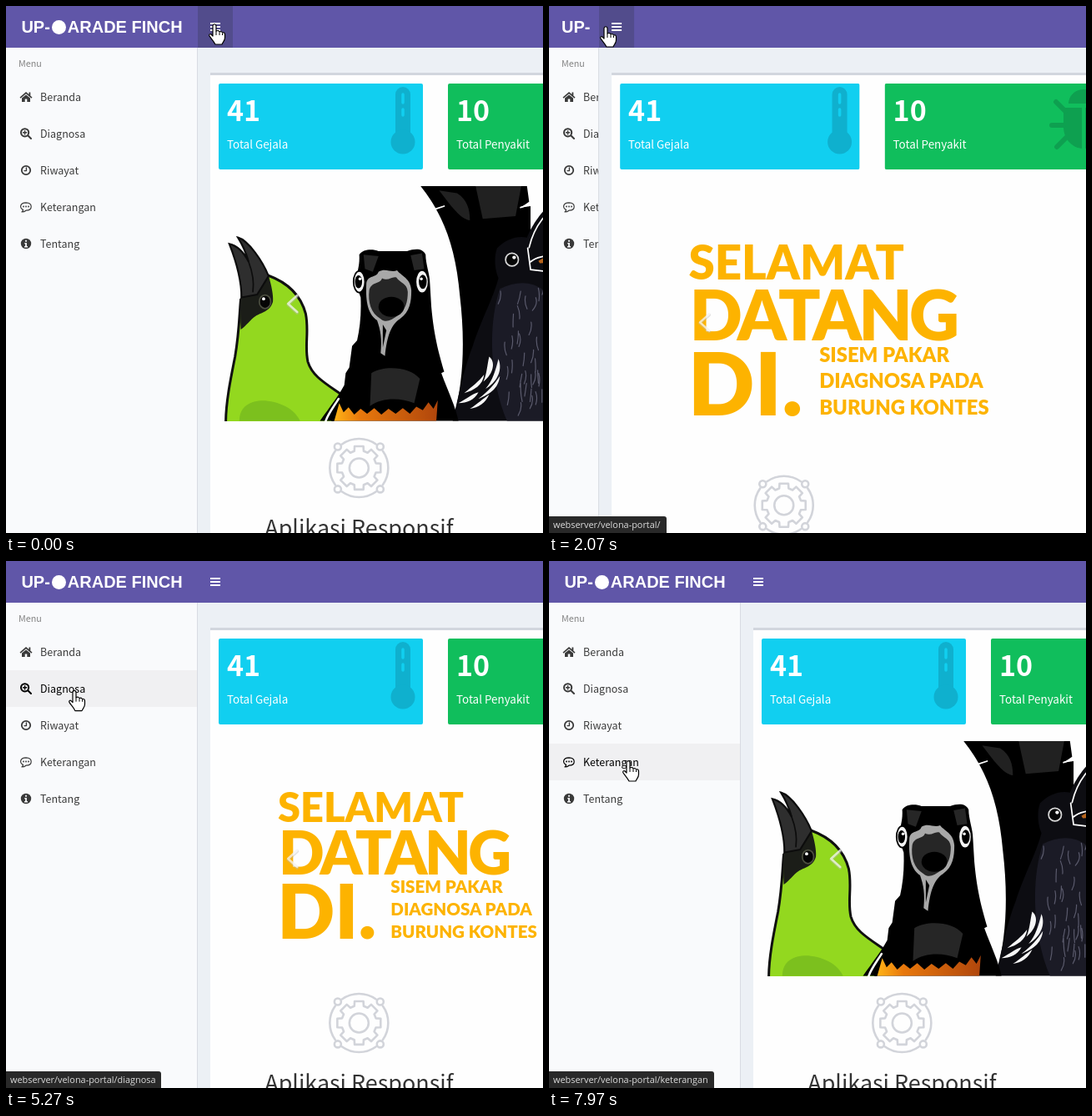
An HTML page that plays this animation: 644x632 px, repeating every 8000 ms.

```html
<!DOCTYPE html>
<html lang="id">
<head>
<meta charset="utf-8">
<title>Dashboard</title>
<style>
  html, body { margin: 0; width: 100%; height: 100%; overflow: hidden; }
  #stage { position: relative; width: 644px; height: 632px; overflow: hidden; }
  #stage > svg { position: absolute; left: 0; top: 0; }
  text { font-family: "Noto Sans CJK JP", "Noto Sans CJK SC", "Noto Sans CJK", "Noto Sans", sans-serif; }
  .poster text { font-family: Lato, sans-serif; font-weight: 900; fill: #fdb300; }
  .poster .block { font-family: "Liberation Sans", sans-serif; font-weight: 700; stroke: #fdb300; stroke-width: 6; }
  .card text { fill: #fff; font-size: 13.4px; }
  .card .count { font-size: 34px; font-weight: 700; }
  .line { fill: none; stroke-linecap: round; stroke-linejoin: round; }
  #logo { position: absolute; left: 0; top: 0; height: 50px; box-sizing: border-box; overflow: hidden;
    text-align: center; color: #fff; font: bold 20px/50px "Liberation Sans", Arial, sans-serif; }
  #logo i { display: inline-block; width: 17px; height: 17px; margin: 0 2px; border-radius: 50%;
    background: #fff; vertical-align: -2px; }
  #status { position: absolute; left: 0; bottom: 0; height: 20px; padding: 0 7px 0 5px; border-radius: 0 3px 0 0;
    background: #292929; color: #dcdcdc; white-space: nowrap; font: 10.9px/20px "Open Sans", "Noto Sans", sans-serif; }
  #pointer { pointer-events: none; }
</style>
</head>
<body>
<div id="stage">
<svg width="644" height="632" viewBox="0 0 644 632">
  <defs>
    <linearGradient id="ember">
      <stop offset="0" stop-color="#ffb316"/><stop offset=".25" stop-color="#e8780c"/><stop offset="1" stop-color="#b0460c"/>
    </linearGradient>

    <g id="birds" transform="translate(-76 -216)">
      <!-- green bird -->
      <path d="M86 548C86 520 92 490 99 455C105 420 105 395 107 375L145 341C175 352 192 372 198 395C203 420 196 440 201 462C207 482 225 492 248 508L235 548Z" fill="#93d81f" stroke="#101010" stroke-width="3.5"/>
      <path d="M105 545C105 522 125 515 145 517C170 520 185 533 190 545Z" fill="#7cc01e"/>
      <path d="M108 350L146 342C150 355 153 370 152 378C148 392 135 393 128 398C120 403 115 412 107 417C106 395 107 370 108 350Z" fill="#1b1d18"/>
      <path d="M103 288C118 292 138 322 146 342L130 368L108 372C108 345 100 320 91 297C100 299 110 306 118 322C114 308 108 296 103 288Z" fill="#2e2e2e" stroke="#0c0c0c" stroke-width="2.5"/>
      <path class="line" d="M118 322C124 338 126 350 124 364" stroke="#0c0c0c" stroke-width="2"/>
      <ellipse cx="141" cy="378" rx="8" ry="9.5" fill="#050505" stroke="#4c4f40" stroke-width="2"/>
      <circle cx="139" cy="374" r="2.2" fill="#fff"/>

      <!-- tail and bird with open beak -->
      <path d="M359 216H508L511 238L499 246L513 244V290L480 380L404 545C420 490 421 430 414 370C408 300 390 255 359 216Z"/>
      <path d="M385 222L410 226C425 235 428 250 428 264C415 262 405 248 385 222ZM436 216H500L492 258L446 262Z" fill="#212121"/>
      <path class="line" d="M380 248l12 -4M499 246l12 -4" stroke="#fff" stroke-width="2"/>
      <path d="M466 303C478 290 495 285 508 288C515 270 535 240 552 236C565 234 563 245 558 258C550 275 546 295 545 312C560 315 570 322 579 328C568 334 558 336 552 338C556 360 552 385 558 405C570 430 572 445 578 460C590 485 592 500 586 510C594 525 594 535 593 545H404C412 510 420 470 432 440C445 400 460 375 468 345C462 330 462 315 466 303Z" fill="#0d0d12"/>
      <path d="M470 360C500 345 530 350 545 380C565 440 575 490 575 545H480C460 500 450 420 470 360Z" fill="#1b1b26"/>
      <path class="line" d="M511 302C518 272 538 246 557 242C546 272 541 296 541 313M509 303L513 333L549 337L575 328L545 315C535 312 520 316 513 322" stroke="#fff" stroke-width="2"/>
      <path d="M524 321C534 312 545 316 549 323L526 324Z" fill="#b8651c"/>
      <circle cx="487" cy="319" r="9" fill="#060606" stroke="#d8d8d8" stroke-width="2"/>
      <circle cx="490" cy="316" r="2.5" fill="#fff"/>
      <path id="plumes" class="line" stroke="#5a5a6c" stroke-width="1.4"/>
      <path d="M455 455C464 462 462 478 447 490C452 478 452 468 455 455ZM468 458C475 475 464 492 450 500C460 488 464 474 468 458ZM448 480C446 495 434 502 420 506C432 496 440 490 448 480ZM470 482C468 500 455 508 440 514C455 502 462 494 470 482ZM440 505C434 516 424 520 412 520C424 514 430 508 440 505ZM455 508C450 520 440 526 428 528C440 520 446 514 455 508Z" fill="#f6f6f6"/>

      <!-- dark bird facing forward -->
      <path d="M218 545C232 525 244 510 252 495L254 478L259 470L263 440L270 432C274 415 276 395 275 372L268 352C270 335 274 328 273 312C278 304 292 304 300 307H340C352 303 362 303 366 312C366 325 372 340 372 352L374 385C378 430 386 455 392 476L388 478C398 505 408 525 412 545Z"/>
      <path class="line" d="M226 545C230 534 238 524 244 514" stroke="#fff" stroke-width="3"/>
      <path d="M279 312L300 314L292 336L281 332ZM345 313L361 310L364 332L350 334ZM290 478C310 466 345 470 358 486L350 520C330 512 305 512 288 524Z" fill="#262626"/>
      <path d="M238 545L245 520L251 533L258 526L266 536L275 528L284 535L294 527L304 536L314 528L324 535L334 527L344 535L353 525L362 530L370 519L377 528L383 516L381 545Z" fill="url(#ember)"/>
      <path d="M283 352C285 340 297 345 300 336C310 330 318 338 326 334C332 342 345 345 346 362C346 378 344 392 330 402C318 410 312 425 309 454L303 450C305 430 303 418 298 404C283 394 282 372 283 352Z" fill="#a8a8a8"/>
      <path d="M287 362C290 349 302 354 305 345C314 350 318 342 325 344C330 352 340 352 341 364C341 378 338 390 326 398C318 404 310 408 303 402C289 394 285 378 287 362Z" fill="#262626"/>
      <ellipse cx="318" cy="385" rx="18" ry="14"/>
      <path d="M306 410L311 418L306 442Z"/>
      <g fill="#f4f4f4" stroke="#000" stroke-width="2">
        <ellipse cx="273" cy="350" rx="8" ry="15"/><ellipse cx="361" cy="350" rx="9" ry="16"/>
      </g>
      <ellipse cx="272" cy="350" rx="5" ry="9"/><ellipse cx="362" cy="350" rx="5.5" ry="10"/>
      <circle cx="274" cy="346" r="2" fill="#fff"/><circle cx="360" cy="346" r="2" fill="#fff"/>
    </g>

    <g id="bug">
      <path d="M-18 -20A18 17 0 0 1 18 -20Z"/>
      <path d="M-24 -15H24V8C24 24 12 34 0 34S-24 24 -24 8Z"/>
      <path class="line" d="M-22 -11L-33 -22M-24 6H-38M-20 20L-32 32M22 -11L33 -22M24 6H38M20 20L32 32" stroke="#0ea050" stroke-width="6"/>
      <path d="M0 -15V34" stroke="#10be5c" stroke-width="4"/>
    </g>
  </defs>

  <rect width="644" height="632" fill="#ecf0f5"/>

  <g id="content">
    <rect x="15" y="80" width="1400" height="3" fill="#d2d6de"/>
    <rect x="15" y="83" width="1400" height="560" fill="#fefefe"/>
  </g>

  <svg class="card" y="93" height="103">
    <rect width="100%" height="103" rx="2" fill="#11cff0"/>
    <g class="badge" fill="#0fb0ce">
      <rect x="-33" y="4" width="18" height="66" rx="9"/><circle cx="-24" cy="70" r="14.5"/>
      <path class="line" d="M-24 13V23M-24 31V38" stroke="#11cff0" stroke-width="3.5"/>
    </g>
    <text class="count" x="10" y="45">41</text><text x="10" y="78">Total Gejala</text>
  </svg>
  <svg class="card" y="93" height="103">
    <rect width="100%" height="103" rx="2" fill="#10be5c"/>
    <g class="badge"><use href="#bug" x="-49" y="44" fill="#0ea050"/></g>
    <text class="count" x="10" y="45">10</text><text x="10" y="78">Total Penyakit</text>
  </svg>

  <svg id="carousel" y="216" viewBox="0 0 1250 329.4" preserveAspectRatio="none">
    <g id="slideA" class="poster">
      <use href="#birds"/>
      <g transform="translate(625 -216)">
        <text x="145" y="340" font-size="68" letter-spacing="-2">WELCOME TO</text>
        <text class="block" x="-14 83 197" y="469" font-size="164">THE</text>
        <g font-size="35">
          <text x="295" y="378">EXPERT SYSTEM</text>
          <text x="295" y="425">ON PAGEANT</text>
          <text x="295" y="472">BIRD DIAGNOSIS</text>
        </g>
      </g>
    </g>
    <g id="slideB" class="poster">
      <text x="83" y="113" font-size="57">SELAMAT</text>
      <text x="84" y="187" font-size="84" letter-spacing="-4">DATANG</text>
      <text x="82" y="277" font-size="106">DI.</text>
      <g font-size="24">
        <text x="241" y="213">SISEM PAKAR</text>
        <text x="241" y="244">DIAGNOSA PADA</text>
        <text x="241" y="276">BURUNG KONTES</text>
      </g>
      <use href="#birds" transform="translate(1252 76) scale(-.77 .77)"/>
    </g>
  </svg>
  <g id="previous" class="line">
    <path d="M6 -10L-5 0L6 10" stroke="#b8b8b8" stroke-width="4" opacity=".4"/>
    <path d="M6 -11L-5 -1L6 9" stroke="#fff" stroke-width="2.6" opacity=".65"/>
  </g>

  <g id="feature">
    <g class="line" stroke="#d2d4da" stroke-width="2.6">
      <path id="gear"/>
      <circle r="11.5"/>
      <path id="orbit"/>
      <g id="nodes"></g>
    </g>
    <text y="82" text-anchor="middle" font-size="26.9" font-weight="300" fill="#333">Aplikasi Responsif</text>
  </g>

  <svg id="side" y="50" height="582">
    <rect width="230" height="582" fill="#f9fafc"/>
    <text id="heading" x="15" y="23" font-size="10.8" fill="#848484">Menu</text>
    <g id="items"></g>
  </svg>
  <path id="edge" d="M-.5 50V632" stroke="#d8dbe2"/>

  <rect width="644" height="50" fill="#6056a8"/>
  <g id="toggle">
    <rect id="toggleHover" width="42" height="50" fill="#524c8c"/>
    <path d="M15 21H27M15 25H27M15 29H27" stroke="#fff" stroke-width="2"/>
  </g>
</svg>

<div id="logo"></div>
<div id="status"></div>

<svg id="pointer" width="644" height="632">
  <g id="cursor" fill="#fff" stroke="#000" stroke-width="1.2" stroke-linejoin="round">
    <path id="arrow" d="M0 0V17L4 13.5L6.5 19.5L9.5 18L7 12.5H12Z"/>
    <g id="hand">
      <path d="M-2 2C-2 -1 2 -1 2 2V8C4 7 5.5 7.5 6 9C8 8 9 9 9.5 10C11 9.5 12.5 10 12.5 12V16C12.5 20 10 21 9 24H1C-1 20 -4 17 -6 14C-7 12 -5 11 -4 12L-2 14Z"/>
      <path d="M2 8V13M6 9.5V13M9.5 10.5V13" fill="none" stroke-width="1"/>
    </g>
  </g>
</svg>
</div>

<script>
const LOOP = 8000;
const $ = id => document.getElementById(id);
const set = (el, attrs) => { for (const k in attrs) el.setAttribute(k, attrs[k]); };
const move = (el, x, y = 0) => set(el, { transform: `translate(${x} ${y})` });
const show = (el, on) => { el.style.display = on ? '' : 'none'; };
const clamp = v => Math.min(1, Math.max(0, v));
const polar = (r, a) => `${(r * Math.cos(a)).toFixed(2)} ${(r * Math.sin(a)).toFixed(2)}`;

const MENU = [
  ['Beranda', '<path d="M-7.5 .5L0 -6L7.5 .5L6.5 1.7L0 -3.8L-6.5 1.7ZM-5 1.5L0 -2.6L5 1.5V6H1.3V2.5H-1.3V6H-5ZM3.5 -5.5H5.3V-1L3.5 -2.6Z"/>'],
  ['Diagnosa', '<path class="line" stroke="currentColor" stroke-width="2" d="M3.2 -1.2A4.6 4.6 0 1 1 -6 -1.2A4.6 4.6 0 0 1 3.2 -1.2ZM2.2 2.2L6 6"/><path stroke="currentColor" stroke-width="1.4" d="M-4 -1.2H1.2M-1.4 -3.8V1.4"/>'],
  ['Riwayat', '<circle r="5.2" class="line" stroke="currentColor" stroke-width="1.8"/><path class="line" stroke="currentColor" stroke-width="1.4" d="M.4 -3V.6H-2"/>'],
  ['Keterangan', '<path class="line" stroke="currentColor" stroke-width="1.2" d="M-3.5 3.4C-8 1 -7.5 -5 0 -5.2C8 -5 8.5 3.8 0 4.2C-1.5 5.5 -3 6 -5 6C-4 5 -3.5 4.5 -3.5 3.4Z"/><path class="line" stroke="currentColor" stroke-width="1.8" d="M-3 -.5H-3M0 -.5H0M3 -.5H3"/>'],
  ['Tentang', '<circle r="6.2"/><path d="M-1.8 -1H.9V3H2V4.4H-2V3H-.9V.3H-1.8ZM-.9 -4.2H.9V-2.2H-.9Z" fill="#f9fafc"/>'],
];
$('items').innerHTML = MENU.map(([label, icon]) => `<g>
  <rect x="0" y="-22" width="229" height="44" fill="#f0f0f2"/>
  <g transform="translate(24)" fill="currentColor">${icon}</g>
  <text x="41" y="5" font-size="12.5" font-weight="500" fill="currentColor">${label}</text></g>`).join('');
const items = [...$('items').children];
const cards = [...document.querySelectorAll('.card')];

// Gear outline with eight teeth, broken ring and four corner nodes
const teeth = [];
for (let i = 0; i < 8; i++)
  for (const [r, d] of [[21, -.27], [26.5, -.2], [26.5, .2], [21, .27]])
    teeth.push(polar(r, i * Math.PI / 4 + d));
set($('gear'), { d: `M${teeth.join('L')}Z` });
const quarters = [0, 1, 2, 3].map(i => i * Math.PI / 2);
set($('orbit'), { d: quarters.map(a => `M${polar(35, a - .62)}A35 35 0 0 1 ${polar(35, a + .62)}`).join('') });
$('nodes').innerHTML = quarters.map(a => {
  const [x, y] = polar(36, a + Math.PI / 4).split(' ');
  return `<circle cx="${x}" cy="${y}" r="4"/>`;
}).join('');

// Fine feather strokes
let seed = 7;
const random = () => (seed = seed * 16807 % 2147483647) / 2147483647;
let strokes = '';
for (let i = 0; i < 46; i++) {
  const y = 350 + random() * 170, x = 470 + (y - 350) * .05 + random() * (68 + (y - 350) * .16);
  strokes += `M${x.toFixed(1)} ${y.toFixed(1)}q${(random() * 6 - 2).toFixed(1)} 9 ${(random() * 8 - 5).toFixed(1)} 18`;
}
set($('plumes'), { d: strokes });

// CSS ease-in-out
function ease(x) {
  if (x <= 0) return 0;
  if (x >= 1) return 1;
  let lo = 0, hi = 1, u = .5;
  for (let i = 0; i < 24; i++) {
    u = (lo + hi) / 2;
    const v = 1 - u;
    if (1.26 * u * v * v + 1.74 * u * u * v + u ** 3 < x) lo = u; else hi = u;
  }
  return u * u * (3 - 2 * u);
}

const COLLAPSE = 246, EXPAND = 2021, SLIDES = [949, 5898];

const PATH = [[0, 250, 22], [450, 251, 22], [950, 250, 23], [1270, 145, 30], [1650, 72, 26], [1800, 68, 25],
  [2450, 68, 25], [2950, 74, 100], [3250, 77, 106], [4100, 77, 106], [4500, 80, 110], [4900, 82, 152],
  [5350, 82, 156], [5750, 84, 199], [7420, 85, 200], [7720, 95, 240], [8000, 95, 240]];
function pointerAt(t) {
  const i = PATH.findIndex(p => p[0] > t);
  const [t0, x0, y0] = PATH[i - 1], [t1, x1, y1] = PATH[i];
  const u = (t - t0) / (t1 - t0), k = u * u * (3 - 2 * u);
  return [x0 + (x1 - x0) * k, y0 + (y1 - y0) * k];
}

const LINKS = [[0, null], [100, '#'], [800, null], [1700, '#'], [2045, ''], [2560, null], [2850, ''],
  [4700, 'diagnosa'], [5550, 'riwayat'], [7590, 'keterangan']];

function render(t) {
  const mini = t >= COLLAPSE && t < EXPAND;
  const side = 230 - 180 * (ease((t - COLLAPSE) / 300) - ease((t - EXPAND) / 300));
  const [px, py] = pointerAt(t);

  // Page layout follows the sidebar width
  const pitch = (1330 - side) / 4, width = 1300 - side, height = width * .2635, left = side + 25;
  move($('content'), side);
  cards.forEach((card, i) => {
    set(card, { x: left + i * pitch, width: pitch - 30 });
    move(card.querySelector('.badge'), pitch - 30);
  });
  set($('carousel'), { x: left, width, height });
  move($('previous'), left + width * .075 + 8, 216 + height / 2 + 1);
  move($('feature'), side + 10 + (1330 - side) / 6, 272 + height);

  // Two slides take turns
  const first = ease((t - SLIDES[0]) / 600), second = ease((t - SLIDES[1]) / 600);
  move($('slideA'), 1250 * (second > 0 ? 1 - second : -first));
  move($('slideB'), 1250 * (second > 0 ? -second : 1 - first));

  // Sidebar
  set($('side'), { width: side });
  move($('edge'), side);
  show($('heading'), !mini);
  const row = !mini && px < side && py >= 87 ? Math.floor((py - 87) / 44) : -1;
  items.forEach((item, i) => {
    move(item, 0, mini ? 19 + 38 * i : 59 + 44 * i);
    item.style.color = i === row ? '#000' : '#3a3a3a';
    show(item.firstElementChild, i === row);
    show(item.lastElementChild, !mini);
  });

  // Header
  const logo = mini ? 'U<i></i>' : 'UP-<i></i>ARADE FINCH';
  if ($('logo').dataset.html !== logo) $('logo').dataset.html = $('logo').innerHTML = logo;
  $('logo').style.width = side + 'px';
  $('logo').style.padding = mini ? 0 : '0 15px';
  move($('toggle'), side);
  show($('toggleHover'), py < 50 && px >= side && px < side + 42);

  // Status bubble and pointer
  const link = LINKS.filter(l => l[0] <= t).pop()[1];
  show($('status'), link !== null);
  $('status').textContent = 'webserver/velona-portal/' + (link || '');
  $('status').style.opacity = t < 800 ? clamp((800 - t) / 350) : 1;
  const overLink = row >= 0 || py < 50 && px < side + 42;
  move($('cursor'), px, py);
  show($('hand'), overLink);
  show($('arrow'), !overLink);
}

const start = performance.now();
function tick() {
  render((performance.now() - start) % LOOP);
  requestAnimationFrame(tick);
}
tick();
</script>
</body>
</html>
```
